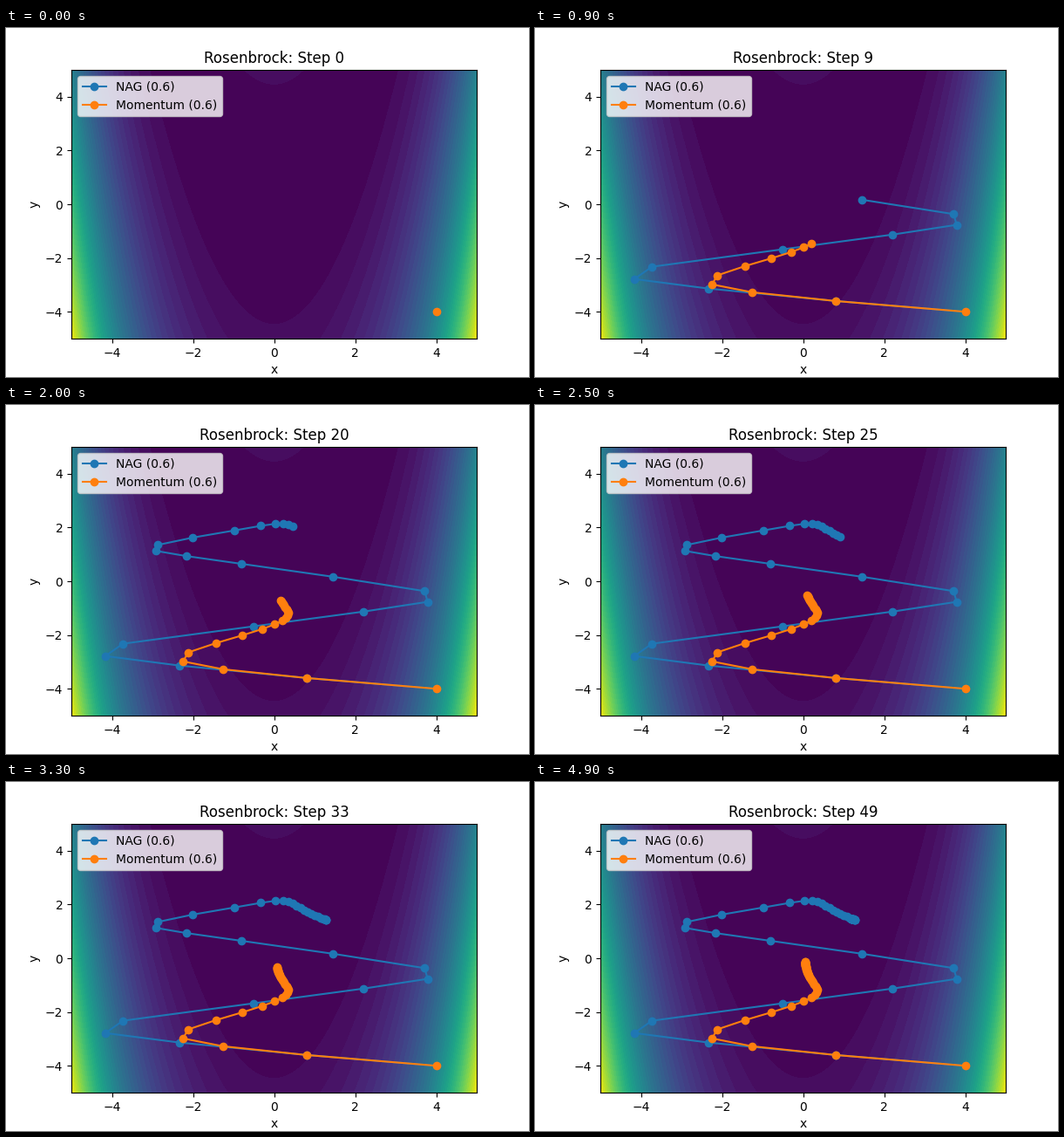
A matplotlib script for the animation above (5000 ms loop, 600 px wide and 400 px high).

```python
import numpy as np
import matplotlib.pyplot as plt
from matplotlib.animation import FuncAnimation

STEPS = 50
RATE = 1e-4
BETA = 0.6
START = (4.0, -4.0)


def rosenbrock(x, y):
    return (1 - x) ** 2 + 100 * (y - x ** 2) ** 2


def gradient(p):
    x, y = p
    return np.array([-2 * (1 - x) - 400 * x * (y - x ** 2),
                     200 * (y - x ** 2)])


def descend(shift):
    """Momentum descent; the gradient is taken at position + shift * velocity."""
    position, velocity = np.array(START), np.zeros(2)
    path = [position]
    for _ in range(STEPS - 1):
        velocity = BETA * velocity - RATE * gradient(position + shift * velocity)
        position = position + velocity
        path.append(position)
    return np.array(path)


paths = {
    "NAG (0.6)": descend(-BETA),
    "Momentum (0.6)": descend(0),
}

fig, ax = plt.subplots(figsize=(6, 4), dpi=100)
axis = np.linspace(-5, 5, 100)
X, Y = np.meshgrid(axis, axis)
ax.contourf(X, Y, rosenbrock(X, Y), levels=50, cmap="viridis")
ax.set(xlim=(-5, 5), ylim=(-5, 5), xlabel="x", ylabel="y")
lines = [ax.plot([], [], "o-", label=name)[0] for name in paths]
ax.legend(loc="upper left")
title = ax.set_title("Rosenbrock: Step 0")


def update(step):
    for line, path in zip(lines, paths.values()):
        line.set_data(*path[:step + 1].T)
    title.set_text(f"Rosenbrock: Step {step}")
    return [*lines, title]


anim = FuncAnimation(fig, update, frames=STEPS, interval=100, repeat=True)
plt.show()
```
